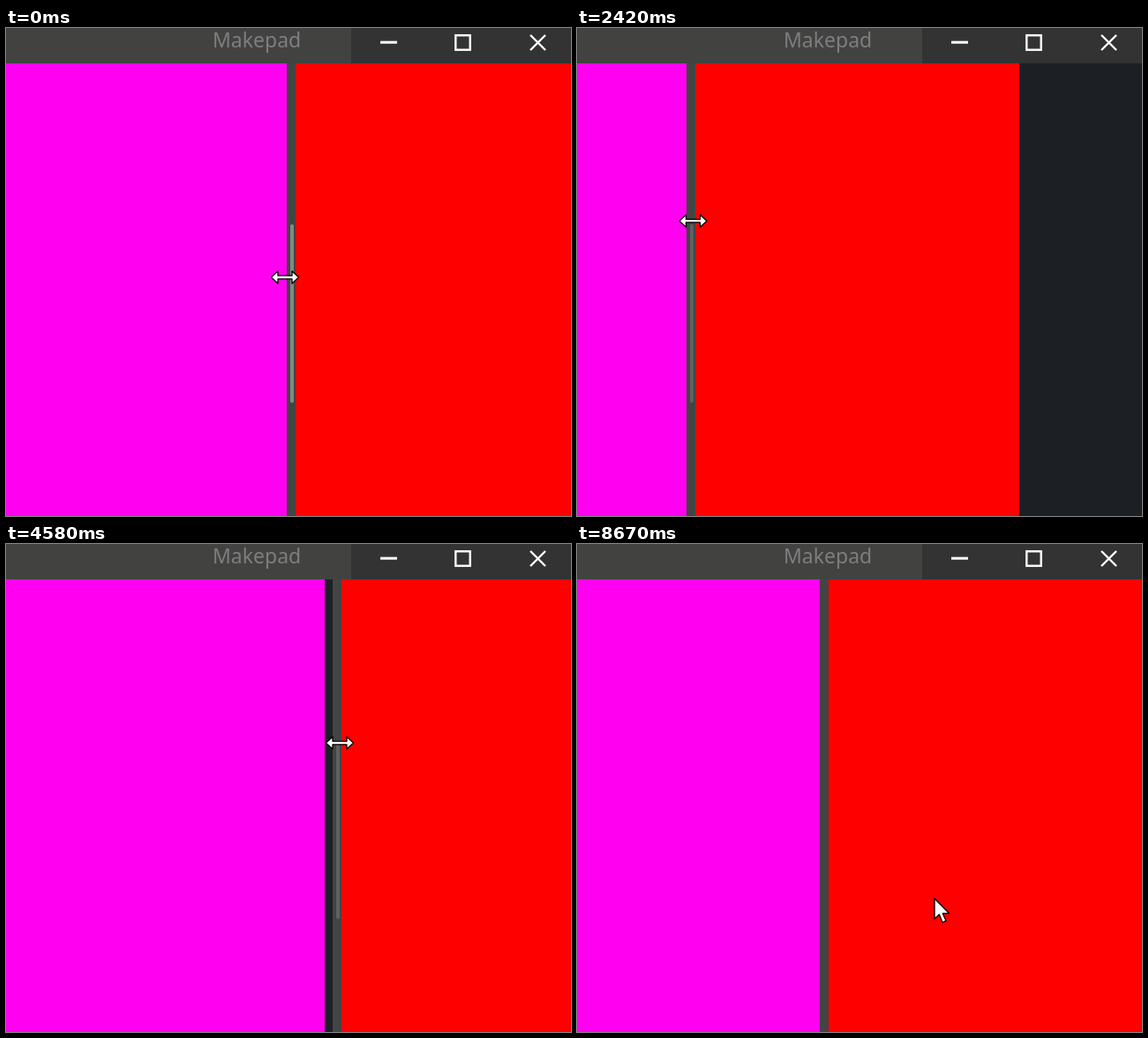
These frames come from a looping animation (640 by 552 pixels, 9080 ms). An HTML page:

```html
<!DOCTYPE html>
<html lang="en">
<head>
<meta charset="utf-8">
<title>Splitter</title>
<style>
  html, body { margin: 0; width: 100%; height: 100%; overflow: hidden; background: #1c1f24; }
  svg { display: block; width: 640px; height: 552px; }
  text { font: 23px "Noto Sans", "Open Sans", sans-serif; fill: #7e7e80; }
  .icons { fill: none; stroke: #fff; stroke-width: 2.4; }
  .pointer { fill: #fff; stroke: #000; stroke-width: 1.3; stroke-linejoin: round; }
</style>
</head>
<body>
<svg viewBox="0 0 640 552">
  <rect width="640" height="552" fill="#1c1f24"/>
  <rect id="left" y="40" height="512" fill="#ff00f0"/>
  <rect id="right" y="40" height="512" fill="#f00"/>
  <g id="bar">
    <rect y="39" width="10" height="513" fill="#444"/>
    <rect id="grip" x="4" y="222" width="4" height="202" rx="2"/>
  </g>
  <rect width="391" height="40" fill="#424241"/>
  <rect x="391" width="249" height="40" fill="#333"/>
  <text x="234" y="22">Makepad</text>
  <g class="icons">
    <path d="M424 16.2H443" stroke-width="3"/>
    <rect x="509.3" y="8.3" width="16.4" height="16.4"/>
    <path d="M594 8L611 25M611 8L594 25"/>
  </g>
  <g id="cursor" class="pointer">
    <path id="resize" d="M-15.5 0L-8-7V-1.8H8V-7L15.5 0L8 7V1.8H-8V7Z"/>
    <path id="arrow" d="M0 0V23L5.3 18L9 27L13 25.2L9.2 16.8H16.5Z"/>
  </g>
</svg>
<script>
const LOOP = 9080, STEP = 1000 / 12;
const PRESS = 14, RELEASE = 66, GRAB = 8;
const MAX_LEFT = 361, MAX_RIGHT = 367;

// Turning points of the pointer: [step, x, y]
const turns = [
  [0, 316, 282], [9, 326, 235], [PRESS, 326, 235],
  [17, 297, 235], [27.7, 121, 218], [41, 570, 225], [43.5, 570, 225],
  [49, 99, 225], [53, 483, 225], [57, 273, 225], [RELEASE, 283, 391],
  [69, 283, 392], [72, 250, 370], [76, 278, 345], [81, 370, 490], [88, 278, 389],
  [92, 382, 466], [96.5, 250, 330], [100, 406, 415], [103, 270, 285], [104, 405, 401]
];

const $ = id => document.getElementById(id);
const [left, right, bar, grip, cursor, resize, arrow] =
  ["left", "right", "bar", "grip", "cursor", "resize", "arrow"].map($);
const show = (el, on) => el.setAttribute("visibility", on ? "visible" : "hidden");
const move = (el, x, y) => el.setAttribute("transform", `translate(${x} ${y})`);
const clamp = (v, lo, hi) => Math.min(Math.max(v, lo), hi);

// Swing from one turning point to the next along half a cosine
function pointer(n) {
  const last = turns.length - 1;
  const i = turns.findIndex(p => p[0] > n);
  const [t, x, y] = turns[i < 0 ? last : i - 1];
  const [t2, x2, y2] = turns[i < 0 ? last : i];
  const e = (1 - Math.cos(Math.PI * (n - t) / (t2 - t || 1))) / 2;
  return [x + (x2 - x) * e, y + (y2 - y) * e];
}

function draw(n) {
  const [cx, cy] = pointer(n);
  const drag = n >= PRESS && n < RELEASE;
  // The splitter follows the pointer between press and release
  const x = Math.round(pointer(clamp(n, PRESS, RELEASE))[0] - GRAB);
  const hot = Math.abs(cx - x - 5) < 9;

  left.setAttribute("width", Math.min(x, MAX_LEFT));
  right.setAttribute("x", x + 10);
  right.setAttribute("width", Math.min(630 - x, MAX_RIGHT));
  move(bar, x, 0);
  grip.setAttribute("fill", drag ? "#606062" : "#848684");
  show(grip, hot);
  move(cursor, cx, cy);
  show(resize, hot);
  show(arrow, !hot);
}

const start = performance.now();
function tick() {
  const t = (performance.now() - start) % LOOP;
  draw(Math.floor((t + 5) / STEP));
  requestAnimationFrame(tick);
}
tick();
</script>
</body>
</html>
```
